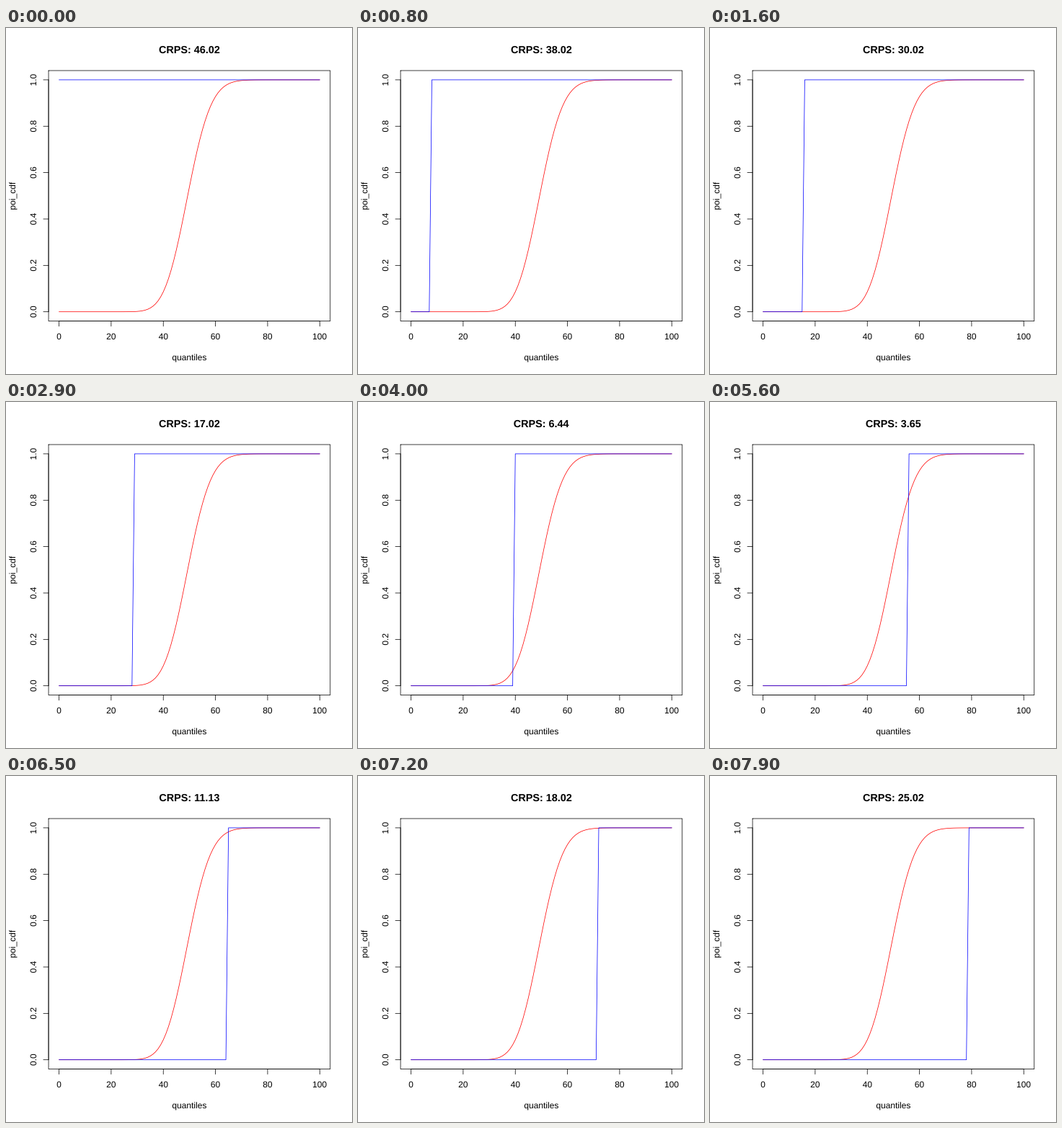
A matplotlib script for the animation above (8000 ms loop, 480x480 px).

```python
import numpy as np
import matplotlib.pyplot as plt
from matplotlib.animation import FuncAnimation
from matplotlib.patches import PathPatch
from matplotlib.textpath import TextPath
from matplotlib.transforms import Affine2D

plt.rcParams["path.simplify"] = False

SIZE, DPI = 480, 72
FRAMES, STEP_MS = 80, 100
LEFT, RIGHT, TOP, BOTTOM = 59.04, 449.76, 59.04, 406.56
MID_X, MID_Y = (LEFT + RIGHT) / 2, (TOP + BOTTOM) / 2
LINE = 14.4          # height of one margin line
TICK = LINE / 2
MEAN = 50

fig = plt.figure(figsize=(SIZE / DPI, SIZE / DPI), dpi=DPI, facecolor="white")
ax = fig.add_axes([0, 0, 1, 1])
ax.set_xlim(0, SIZE)
ax.set_ylim(SIZE, 0)
ax.axis("off")


def px(q):
    return LEFT + (RIGHT - LEFT) * (q / 100 + 0.04) / 1.08


def py(p):
    return BOTTOM - (BOTTOM - TOP) * (p + 0.04) / 1.08


def stroke(x, y, color="black"):
    line, = ax.plot(x, y, color=color, lw=0.75, snap=False,
                    solid_capstyle="round", solid_joinstyle="round")
    return line


def text_path(x, y, s, size=12, weight="normal", angle=0):
    """Outline of s, centred on x along its baseline at y."""
    path = TextPath((0, 0), s, size=size,
                    prop={"family": "Liberation Sans", "weight": weight})
    box = path.get_extents()
    place = (Affine2D().translate(-(box.x0 + box.x1) / 2, 0)
             .scale(1, -1).rotate_deg(-angle).translate(x, y))
    return path.transformed(place)


def label(*args, **kw):
    patch = PathPatch(text_path(*args, **kw), fc="black", lw=0, snap=False)
    return ax.add_patch(patch)


def title_path(value):
    return text_path(MID_X, 35, f"CRPS: {round(value, 2):g}", LINE, "bold")


quantiles = np.arange(101)
pmf = np.exp(-MEAN) * np.cumprod(np.r_[1, MEAN / quantiles[1:]])
poi_cdf = np.cumsum(pmf)


def step_cdf(k):
    return (quantiles >= k).astype(float)


# Curves
stroke(px(quantiles), py(poi_cdf), "#ff0000")
step = stroke(px(quantiles), py(step_cdf(0)), "#0000ff")

# Axes and frame
stroke([px(0), px(100)], [BOTTOM, BOTTOM])
for q in range(0, 101, 20):
    stroke([px(q), px(q)], [BOTTOM, BOTTOM + TICK])
    label(px(q), 432, str(q))

stroke([LEFT, LEFT], [py(0), py(1)])
for p in np.arange(6) / 5:
    stroke([LEFT, LEFT - TICK], [py(p), py(p)])
    label(42, py(p), f"{p:.1f}", angle=90)

stroke([LEFT, RIGHT, RIGHT, LEFT, LEFT], [TOP, TOP, BOTTOM, BOTTOM, TOP])

label(MID_X, 461, "quantiles")
label(13, MID_Y, "poi_cdf", angle=90)
title = ax.add_patch(PathPatch(title_path(0), fc="black", lw=0, snap=False))


def update(k):
    observed = step_cdf(k)
    step.set_ydata(py(observed))
    title.set_path(title_path(np.sum((poi_cdf - observed) ** 2)))
    return step, title


anim = FuncAnimation(fig, update, frames=FRAMES, interval=STEP_MS,
                     init_func=lambda: update(0), repeat=True,
                     repeat_delay=0, blit=False)
plt.show()
```
